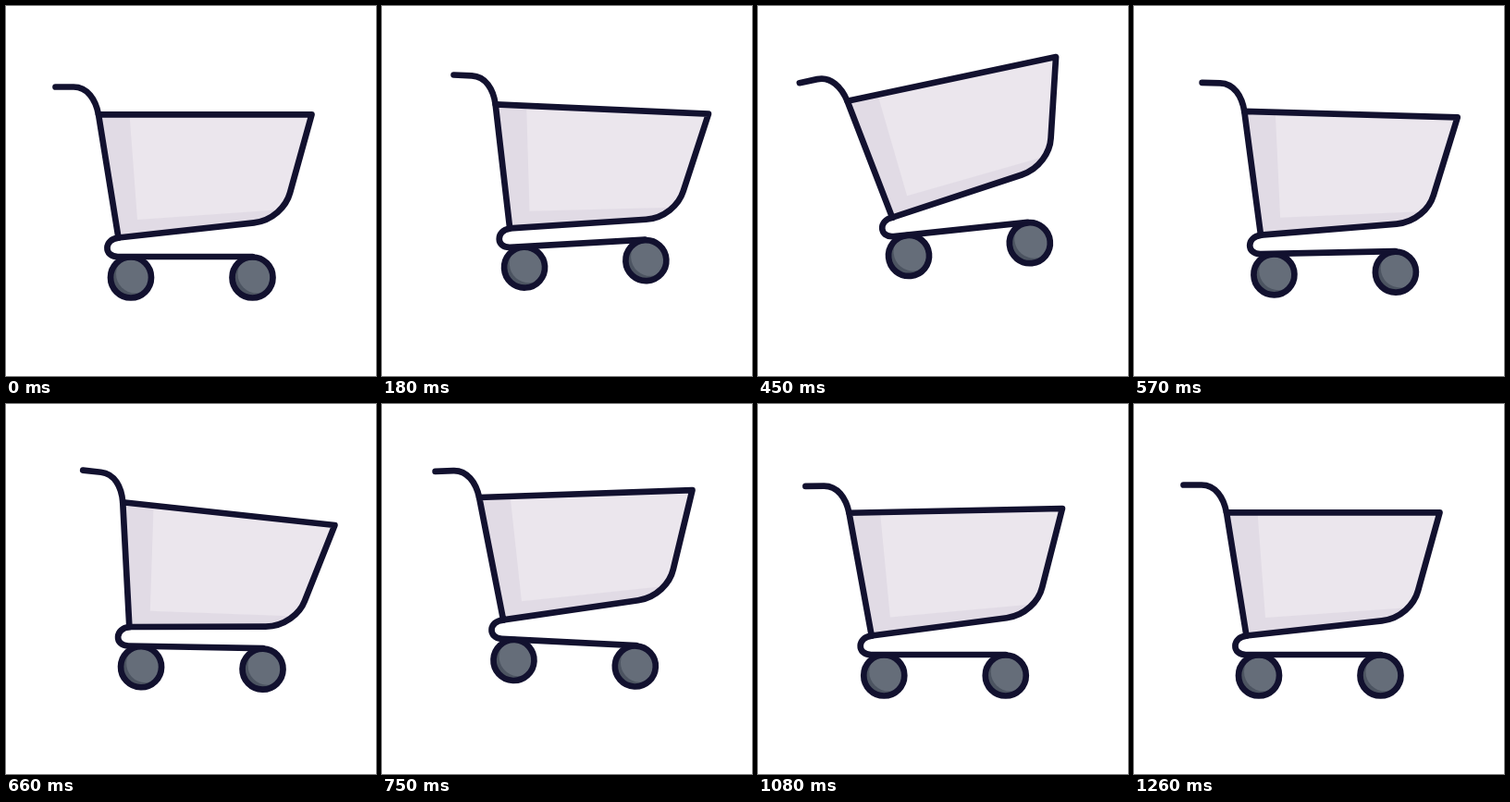
These frames come from a looping animation (400 by 400 pixels, 3.29 s). An HTML page with a canvas:

```html
<!DOCTYPE html>
<html>
<head>
<meta charset="utf-8">
<style>
html, body { margin: 0; width: 100%; height: 100%; overflow: hidden; background: #fff; }
canvas { display: block; width: 100vw; height: 100vh; }
</style>
</head>
<body>
<canvas id="stage"></canvas>
<script>
const LOOP = 3290, STEP = 30, SETTLED = 1260;
const INK = '#12112f', LIGHT = '#ebe6ed', SHADE = '#e1dbe5', TYRE = '#656d79', TYRE_DARK = '#4c5461';
const canvas = document.getElementById('stage');
const ctx = canvas.getContext('2d');

const span = (t, from, to) => Math.min(1, Math.max(0, (t - from) / (to - from)));
const arc = u => Math.sin(Math.PI * u);
const wave = u => Math.sin(2 * Math.PI * u);

function pose(t) {
  if (t >= SETTLED) return { x: 0, y: 0, tilt: 0, lean: 0 };
  // a big hop that falls faster than it rises, then a small one
  const big = arc(span(t, 0, 585) ** 1.657);
  const small = arc(span(t, 585, 950));
  // roll forward, then drift back
  const push = 28.3 * Math.sin(Math.PI / 2 * span(t, 0, 385));
  const drift = Math.exp(-Math.max(0, t - 445) / 230) * (1 - (t / SETTLED) ** 8);
  return {
    x: push * drift,
    y: -34 * big - 13.4 * small,
    tilt: -6.6 * big ** 0.85 + 2.9 * small ** 2,
    // the basket rocks once per bounce
    lean: 6.6 * wave(span(t, 0, 547)) + 6.4 * wave(span(t, 547, 867)) + 1.7 * wave(span(t, 867, 1110))
  };
}

function turn(x, y, deg) {
  ctx.translate(x, y);
  ctx.rotate(deg * Math.PI / 180);
  ctx.translate(-x, -y);
}

const basket = new Path2D('M100 117.3H330.5L307 202C303 217 288 232 268 234.3L121.5 250.5Z');
const glow = new Path2D('M133.5 117H340V217L142 231Z');
const handle = new Path2D('M53.5 87.5H73C88 87.5 97 101 100 117.3');
const frame = new Path2D('M121.5 250.7C106 252 105 271 121 271H266.5');

function wheel(x, y) {
  const disc = new Path2D();
  disc.arc(x, y, 22, 0, 7);
  ctx.save();
  ctx.clip(disc);
  ctx.fillStyle = TYRE_DARK;
  ctx.fill(disc);
  ctx.fillStyle = TYRE;
  ctx.beginPath();
  ctx.arc(x + 5, y - 4, 21, 0, 7);
  ctx.fill();
  ctx.restore();
  ctx.stroke(disc);
}

function draw(t) {
  const { x, y, tilt, lean } = pose(t);
  ctx.fillStyle = '#fff';
  ctx.fillRect(0, 0, 400, 400);
  ctx.strokeStyle = INK;
  ctx.lineWidth = 6.7;
  ctx.lineCap = ctx.lineJoin = 'round';

  ctx.save();
  ctx.translate(x, y);
  turn(200.75, 293.5, tilt);
  wheel(135, 293.5);
  wheel(266.5, 293.5);
  ctx.stroke(frame);

  turn(121.5, 250.5, lean);
  ctx.fillStyle = SHADE;
  ctx.fill(basket);
  ctx.save();
  ctx.clip(basket);
  ctx.fillStyle = LIGHT;
  ctx.fill(glow);
  ctx.restore();
  ctx.stroke(basket);
  ctx.stroke(handle);
  ctx.restore();
}

function fit() {
  const ratio = window.devicePixelRatio || 1;
  canvas.width = innerWidth * ratio;
  canvas.height = innerHeight * ratio;
  ctx.setTransform(canvas.width / 400, 0, 0, canvas.height / 400, 0, 0);
}

const start = performance.now();
function tick() {
  const t = Math.max(0, performance.now() - start) % LOOP;
  draw(Math.floor(t / STEP) * STEP);
  requestAnimationFrame(tick);
}
addEventListener('resize', fit);
fit();
tick();
</script>
</body>
</html>
```
